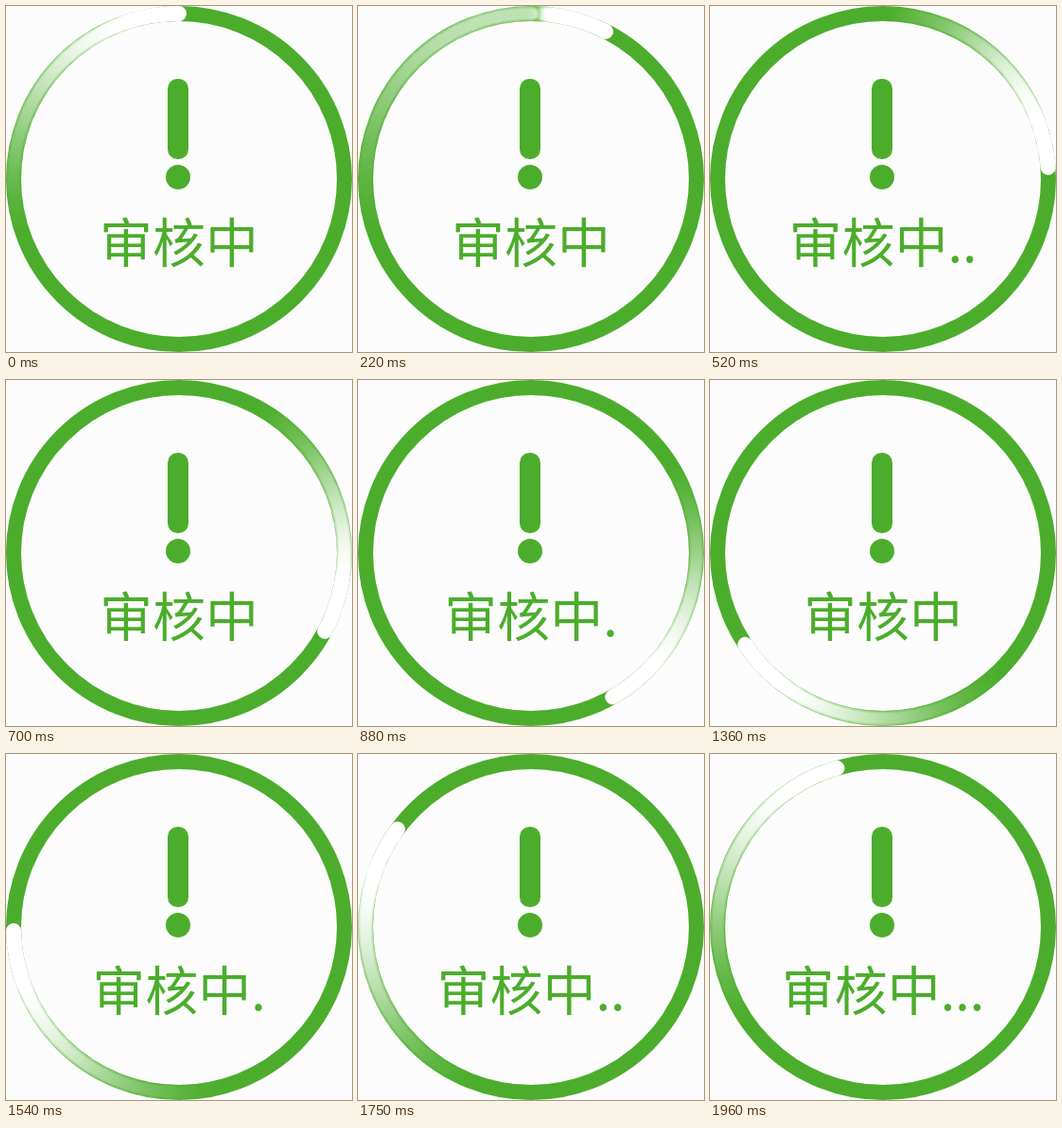
These frames come from a looping animation (366x366 px, 1990 ms). An HTML page with a canvas:

```html
<!DOCTYPE html>
<html lang="zh-CN">
<head>
<meta charset="utf-8">
<style>
  html, body { margin: 0; width: 100%; height: 100%; overflow: hidden; background: #fcfcfc; }
  canvas, svg { position: absolute; left: 0; top: 0; width: 366px; height: 366px; }
  svg { fill: #4bad2b; }
  text { font: 400 56px "Noto Sans CJK SC", "Noto Sans CJK", sans-serif; text-anchor: middle; }
</style>
</head>
<body>
<canvas id="ring" width="366" height="366"></canvas>
<svg viewBox="0 0 366 366">
  <rect x="171" y="77" width="22" height="85" rx="10.5"/>
  <circle cx="182" cy="181" r="13"/>
  <text id="label" x="183" y="271">审核中</text>
</svg>
<script>
  const LOOP = 1990, HOLD = 100, STEP = 30, TURN = 67;
  const C = 183, R = 175, WIDTH = 16;
  const ctx = document.getElementById('ring').getContext('2d');
  const label = document.getElementById('label');
  const clamp = x => Math.min(1, Math.max(0, x));
  const smooth = x => x * x * (3 - 2 * x);
  const rad = deg => (deg - 90) * Math.PI / 180;

  // White tail behind `head` (degrees); `born` softly cuts it off at the top.
  function drawTail(head, length, opacity, born) {
    const fade = d => {
      const a = 1 - smooth(clamp((d - 18) / (length - 18)));
      return born ? a * clamp((head - d) / 5) : a;
    };
    const gradient = ctx.createConicGradient(rad(head - 340), C, C);
    const stop = (d, a) => gradient.addColorStop((340 - d) / 360,
      `rgba(255,255,255,${(1 - Math.cbrt(1 - a * opacity)).toFixed(4)})`);
    stop(340, 0);
    for (let d = Math.ceil(length / 2) * 2; d >= 0; d -= 2) stop(d, fade(d));
    stop(-20, fade(0));

    ctx.strokeStyle = gradient;
    ctx.lineCap = 'round';
    // Stacked widths leave the edges greener than the middle.
    for (const width of [WIDTH, 14, 11]) {
      ctx.lineWidth = width;
      ctx.beginPath();
      ctx.arc(C, C, R, rad(head - length - 2), rad(head));
      ctx.stroke();
    }
  }

  const tailLength = k => 85 + 0.45 * k;

  function draw(k) {
    ctx.clearRect(0, 0, 366, 366);
    ctx.strokeStyle = '#4bad2b';
    ctx.lineWidth = WIDTH;
    ctx.beginPath();
    ctx.arc(C, C, R, 0, 2 * Math.PI);
    ctx.stroke();

    // The finished turn fades out in place while the next one grows.
    const left = 1 - k / 14;
    if (left > 0) drawTail(360, tailLength(TURN), left, false);
    if (k > 0) drawTail(k * 360 / TURN, tailLength(k), 1, true);

    label.textContent = '审核中' + '.'.repeat(Math.floor(k / 5.5) % 4);
  }

  const start = performance.now();
  let shown = -1;

  function tick() {
    const t = (performance.now() - start) % LOOP;
    const i = t < HOLD ? 0 : 1 + Math.floor((t - HOLD) / STEP);
    const k = i > 9 ? i + 1 : i; // one step is skipped early in the turn
    if (k !== shown) draw(shown = k);
    requestAnimationFrame(tick);
  }
  tick();
</script>
</body>
</html>
```
